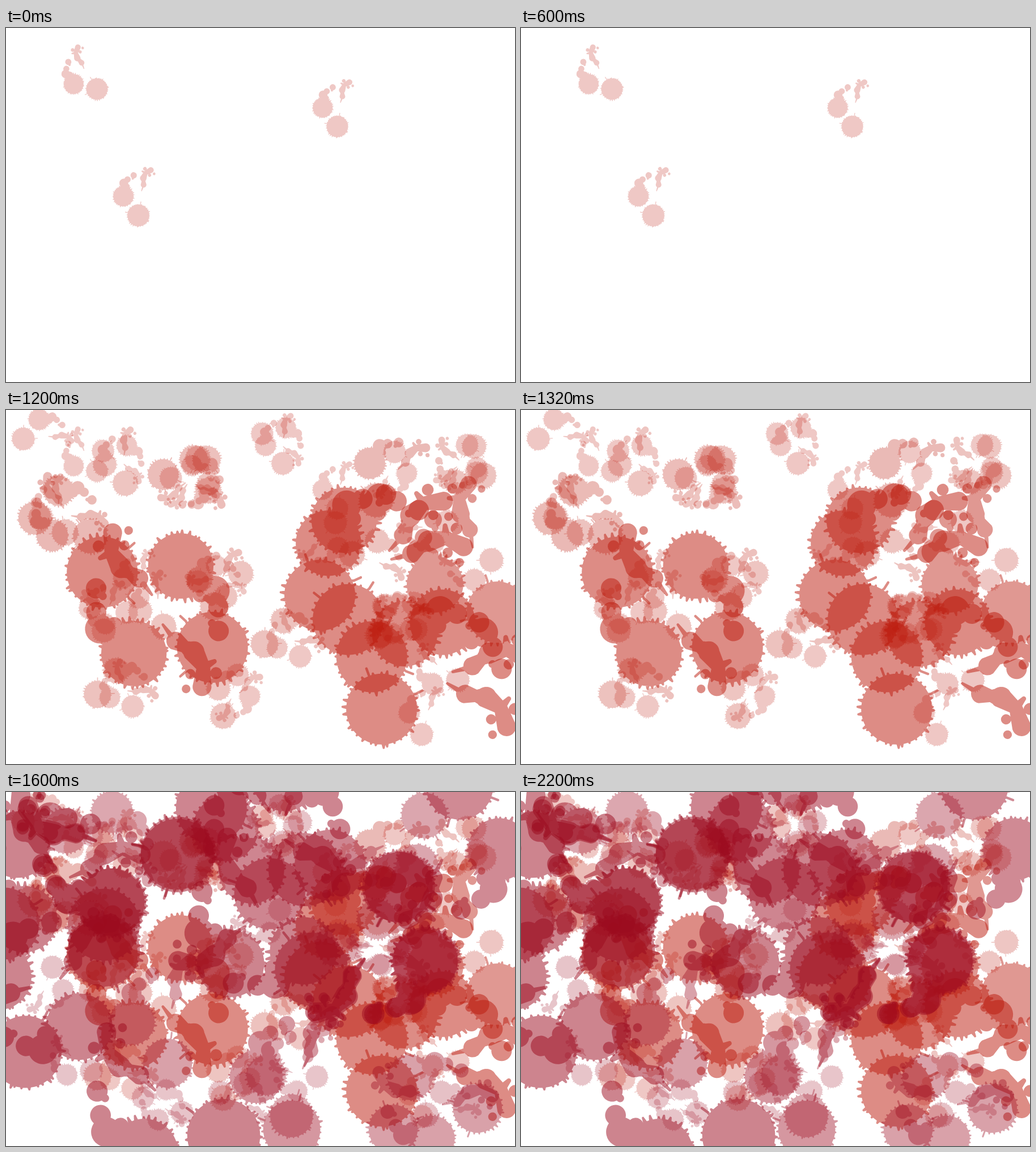
An HTML page with a canvas for the animation above (2.6 s loop, 898 px wide and 624 px high).

```html
<!DOCTYPE html>
<html lang="en">
<head>
<meta charset="utf-8">
<title>Paint splatter</title>
<style>
  html, body { margin: 0; width: 100%; height: 100%; overflow: hidden; background: #fff; }
  canvas { display: block; }
</style>
</head>
<body>
<canvas id="stage" width="898" height="624"></canvas>
<script>
const ctx = document.getElementById('stage').getContext('2d');
const LOOP = 2600;
const RED = '186,24,10';
const CRIMSON = '156,10,31';
const SMALL = 43;
const LARGE = 90;
const PIVOT = [0.34, -0.53];

// A burst is x, y, size and one angle per splat: the brush turns about one spot.
const steps = [
  { at: 0, ink: RED, bursts: [
    [138, 80, 42, 12], [585, 138, 42, 52], [234, 294, 43, 52]
  ] },
  { at: 1000, ink: RED, bursts: [
    [105, 186, 67, 1], [104, 181, 64, 131], [90, 175, 51, 32],
    [327, 125, 60, 154, -93, -113, 149], [680, 110, 66, 80, -120],
    [561, 230, 44, -96], [743, 209, 44, -58], [177, 350, 46, 58, -28],
    [375, 301, 54, 61, -57, 139], [205, 491, 53, 128, 21],
    [500, 403, 53, 129, 20], [403, 503, 49, 80, -120],
    [692, 369, 52, 102, 100, -84, -10], [739, 535, 44, 60]
  ] },
  { at: 1200, ink: RED, bursts: [
    [267, 352, 139, 175.5, -4.5], [760, 461, 139, 154, 107],
    [652, 262, 139, 75.5, 108], [820, 266, 120, 24], [818, 272, 46, -50],
    [67, 43, 44, 129], [204, 88, 49, 42, 167], [485, 57, 44, 46, 166],
    [804, 97, 50, -13, -95, -114], [764, 457, 45, -9],
    [265, 342, 49, 33], [652, 262, 50, 152]
  ] },
  { at: 1400, ink: CRIMSON, bursts: [
    [181, 104, 144, -35], [177, 90, 88, 158, 83],
    [73, 345, 141, -72, 70], [73, 345, 44, -115],
    [450, 230, 143, 4, -89], [450, 225, 44, -67],
    [655, 278, 138, -111], [655, 277, 46, -48],
    [276, 551, 143, -12], [276, 551, 44, -17, 161],
    [512, 500, 112, 56], [512, 500, 84, 58, -36],
    [118, 473, 44, -10], [415, 542, 46, 159], [780, 557, 48, 124]
  ] },
  { at: 1600, ink: CRIMSON, bursts: [
    [475, 62, 139, 158, 56, -4], [480, 60, 46, -49, -124],
    [181, 104, 143, -37], [85, 153, 141, 4, 100],
    [787, 100, 132, -122], [683, 93, 89, -82],
    [655, 278, 138, -109], [655, 277, 84, 147, -40],
    [751, 550, 96, -33.5, 108], [282, 397, 96, 49]
  ] }
];

function seeded(seed) {
  return () => (seed = seed * 16807 % 2147483647) / 2147483647;
}

// All parts wind the same way, so one fill gives their union.
function dot(path, x, y, r) {
  path.moveTo(x + r, y);
  path.arc(x, y, r, 0, Math.PI * 2);
  path.closePath();
}

function bar(path, x1, y1, x2, y2, r1, r2 = r1) {
  const a = Math.atan2(y2 - y1, x2 - x1), q = Math.PI / 2;
  path.moveTo(x2 + r2 * Math.sin(a), y2 - r2 * Math.cos(a));
  path.arc(x2, y2, r2, a - q, a + q);
  path.arc(x1, y1, r1, a + q, a + 3 * q);
  path.closePath();
}

function blot(path, x, y, r, seed) {
  const rand = seeded(seed), count = 34;
  dot(path, x, y, r);
  for (let i = 0; i < count; i++) {
    const a = (i + rand() * 0.6) / count * Math.PI * 2;
    const tip = r + 0.006 + 0.05 * rand() ** 2;
    const c = Math.cos(a), s = Math.sin(a);
    bar(path, x + c * (r - 0.025), y + s * (r - 0.025), x + c * tip, y + s * tip, 0.03, 0.014);
  }
}

// Unit brush: first blot at the origin, second at (1, 0), a trail of drops above.
function makeBrush() {
  const p = new Path2D();
  blot(p, 0, 0, 0.415, 71);
  blot(p, 1, 0, 0.45, 1933);

  const drops = [
    [-0.41, -0.345, 0.185], [-0.435, -0.56, 0.128], [-0.22, -0.38, 0.1],
    [-0.414, -0.86, 0.13], [-0.336, -0.755, 0.05], [-0.014, -1.377, 0.065],
    [0.055, -1.56, 0.055], [-0.34, -1.39, 0.075]
  ];
  for (const d of drops) dot(p, ...d);

  const trail = [
    [0.139, -0.945, 0.118], [0.03, -1.025, 0.08], [-0.079, -1.1, 0.135],
    [-0.188, -1.3, 0.085], [-0.149, -1.547, 0.12]
  ];
  trail.forEach(([x, y, r], i) => {
    if (i) bar(p, trail[i - 1][0], trail[i - 1][1], x, y, trail[i - 1][2], r);
  });

  bar(p, -0.188, -1.3, -0.33, -1.24, 0.06, 0.03);
  bar(p, 0.18, -0.89, 0.285, -0.725, 0.035, 0.017);
  bar(p, 0.69, -0.355, 0.625, -0.425, 0.016);
  bar(p, 0.645, 0.275, 0.565, 0.335, 0.016);
  return p;
}

const brush = makeBrush();

function splat(ink, x, y, size, degrees) {
  const a = degrees * Math.PI / 180;
  const c = size * Math.cos(a), s = size * Math.sin(a);
  const [u, v] = PIVOT;
  const opacity = Math.min(0.5, 0.12 + 0.0027 * size);
  ctx.setTransform(c, s, -s, c, x - u * c + v * s, y - u * s - v * c);
  ctx.fillStyle = `rgba(${ink},${opacity})`;
  ctx.fill(brush);
}

// Small brushes shrink during a burst, large ones keep their size.
function burst(ink, [x, y, size, ...angles]) {
  const end = size < LARGE ? SMALL : size;
  const gaps = Math.max(1, angles.length - 1);
  angles.forEach((a, i) => splat(ink, x, y, size + (end - size) * i / gaps, a));
}

function draw(count) {
  ctx.setTransform(1, 0, 0, 1, 0, 0);
  ctx.fillStyle = '#fff';
  ctx.fillRect(0, 0, 898, 624);
  for (const { ink, bursts } of steps.slice(0, count)) {
    for (const b of bursts) burst(ink, b);
  }
}

let shown = 0;
function tick() {
  const t = performance.now() % LOOP;
  const count = steps.filter(s => t >= s.at).length;
  if (count !== shown) draw(shown = count);
  requestAnimationFrame(tick);
}
tick();
</script>
</body>
</html>
```
